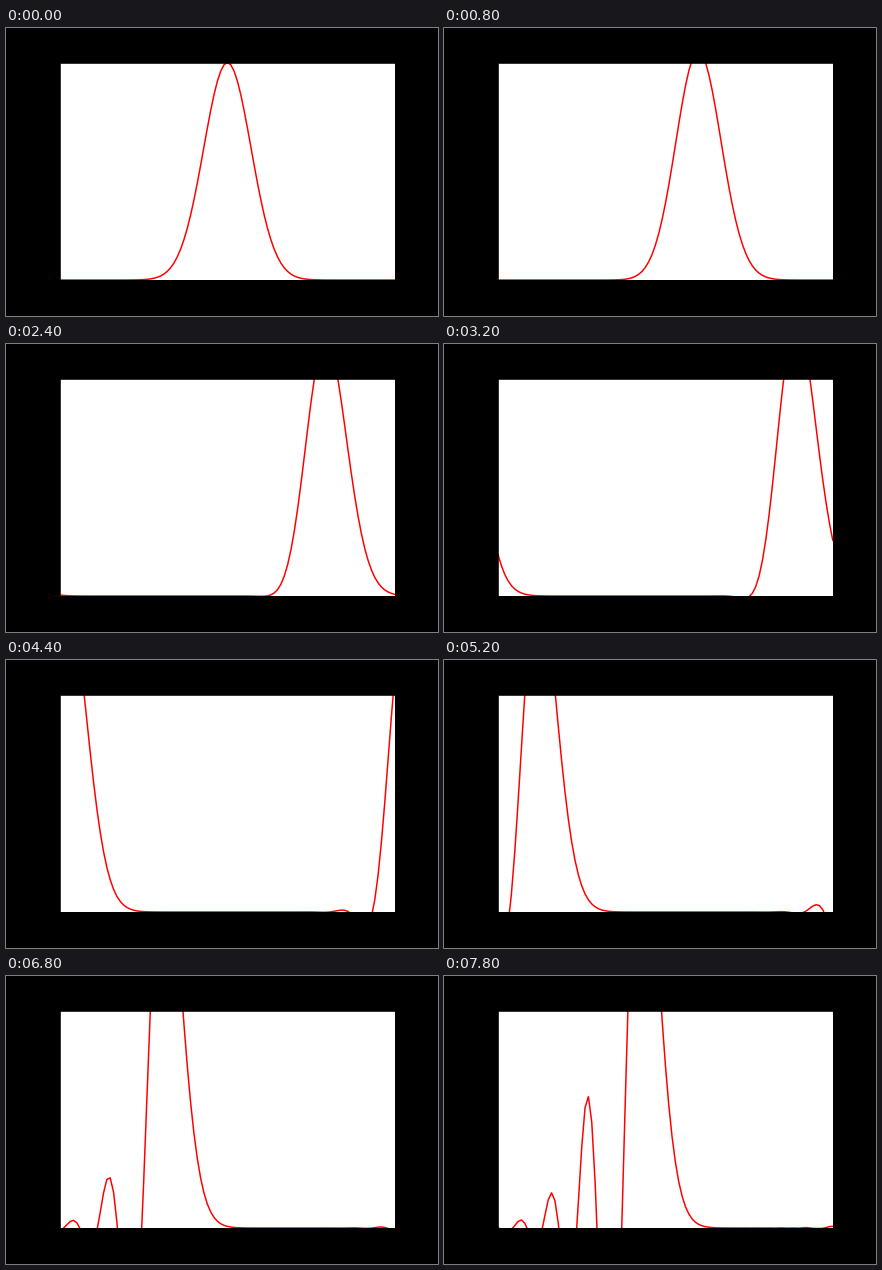
A matplotlib script that plays this animation: 432x288 px, repeating every 8000 ms.

```python
import numpy as np
import matplotlib.pyplot as plt
from matplotlib.animation import FuncAnimation

# Advection of a Gaussian pulse on a periodic grid,
# forward in time and centred in space (unstable, so it grows and ripples).
POINTS = 101
COURANT = 0.5
STEPS_PER_FRAME = 5
FRAMES = 40
INTERVAL = 200


def step(u):
    return u - 0.5 * COURANT * (np.roll(u, -1) - np.roll(u, 1))


def solve(u):
    states = [u]
    for _ in range(FRAMES - 1):
        for _ in range(STEPS_PER_FRAME):
            u = step(u)
        states.append(u)
    return states


x = np.linspace(0, 1, POINTS)
states = solve(np.exp(-100 * (x - 0.5) ** 2))

fig = plt.figure(figsize=(6, 4), dpi=72, facecolor="black")
ax = fig.add_axes([0.125, 0.125, 0.775, 0.755], facecolor="white")
ax.set(xlim=(0, 1), ylim=(0, 1), xticks=[], yticks=[])
for spine in ax.spines.values():
    spine.set(color="black", linewidth=0.8)
line, = ax.plot(x, states[0], color="red", linewidth=1.5)


def update(frame):
    line.set_ydata(states[frame])
    return line,


anim = FuncAnimation(fig, update, frames=FRAMES, interval=INTERVAL,
                     repeat=True, repeat_delay=0)
plt.show()
```
